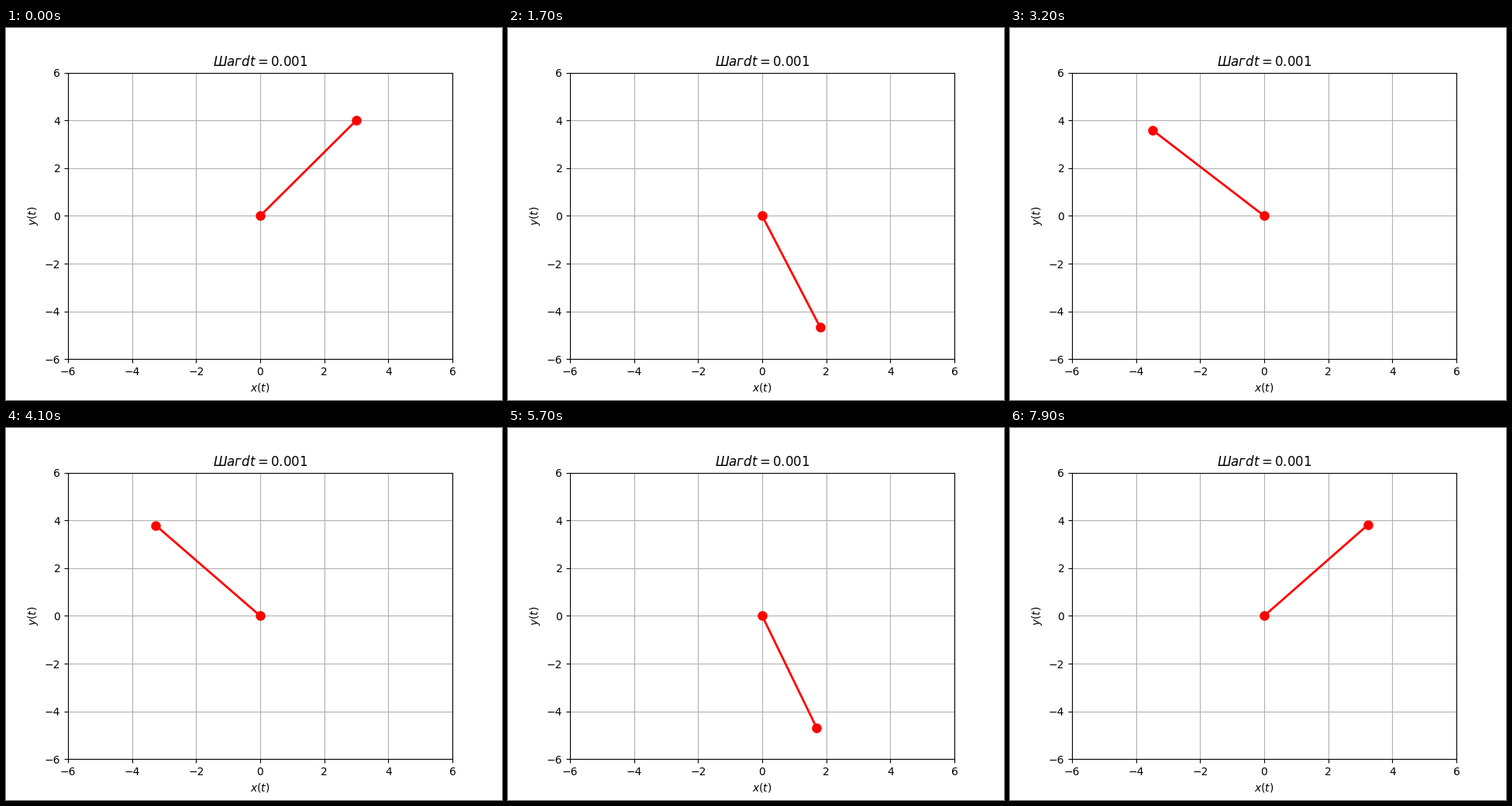
These frames come from a looping animation (640 by 480 pixels, 8000 ms). A matplotlib script:

```python
import numpy as np
import matplotlib.pyplot as plt
from matplotlib.animation import FuncAnimation

G, L = 9.81, 5.0
GAIN = 5.8e-4          # slow energy growth of the explicit scheme
FRAMES, INTERVAL = 80, 100
SUBSTEPS = 50


def rhs(s):
    angle, omega = s
    return np.array([omega, -G / L * np.sin(angle) + GAIN * omega**3])


def rk4(s, h):
    a = rhs(s)
    b = rhs(s + h / 2 * a)
    c = rhs(s + h / 2 * b)
    d = rhs(s + h * c)
    return s + h / 6 * (a + 2 * b + 2 * c + d)


def swing():
    """Angle from the downward vertical for every frame."""
    state = np.array([np.arctan2(3, -4), 0.0])
    h = INTERVAL / 1000 / SUBSTEPS
    angles = []
    for _ in range(FRAMES):
        angles.append(state[0])
        for _ in range(SUBSTEPS):
            state = rk4(state, h)
    return np.array(angles)


angles = swing()
xs, ys = L * np.sin(angles), -L * np.cos(angles)

fig, ax = plt.subplots(figsize=(6.4, 4.8), dpi=100)
ax.set_xlim(-6, 6)
ax.set_ylim(-6, 6)
ax.set_xlabel("$x(t)$")
ax.set_ylabel("$y(t)$")
ax.set_title("$Шаг dt = 0.001$")
ax.grid(True)
rod, = ax.plot([0, xs[0]], [0, ys[0]], "o-", color="red", lw=2, ms=8)


def update(i):
    rod.set_data([0, xs[i]], [0, ys[i]])
    return rod,


anim = FuncAnimation(fig, update, frames=FRAMES, interval=INTERVAL,
                     repeat=True, repeat_delay=0)
plt.show()
```
